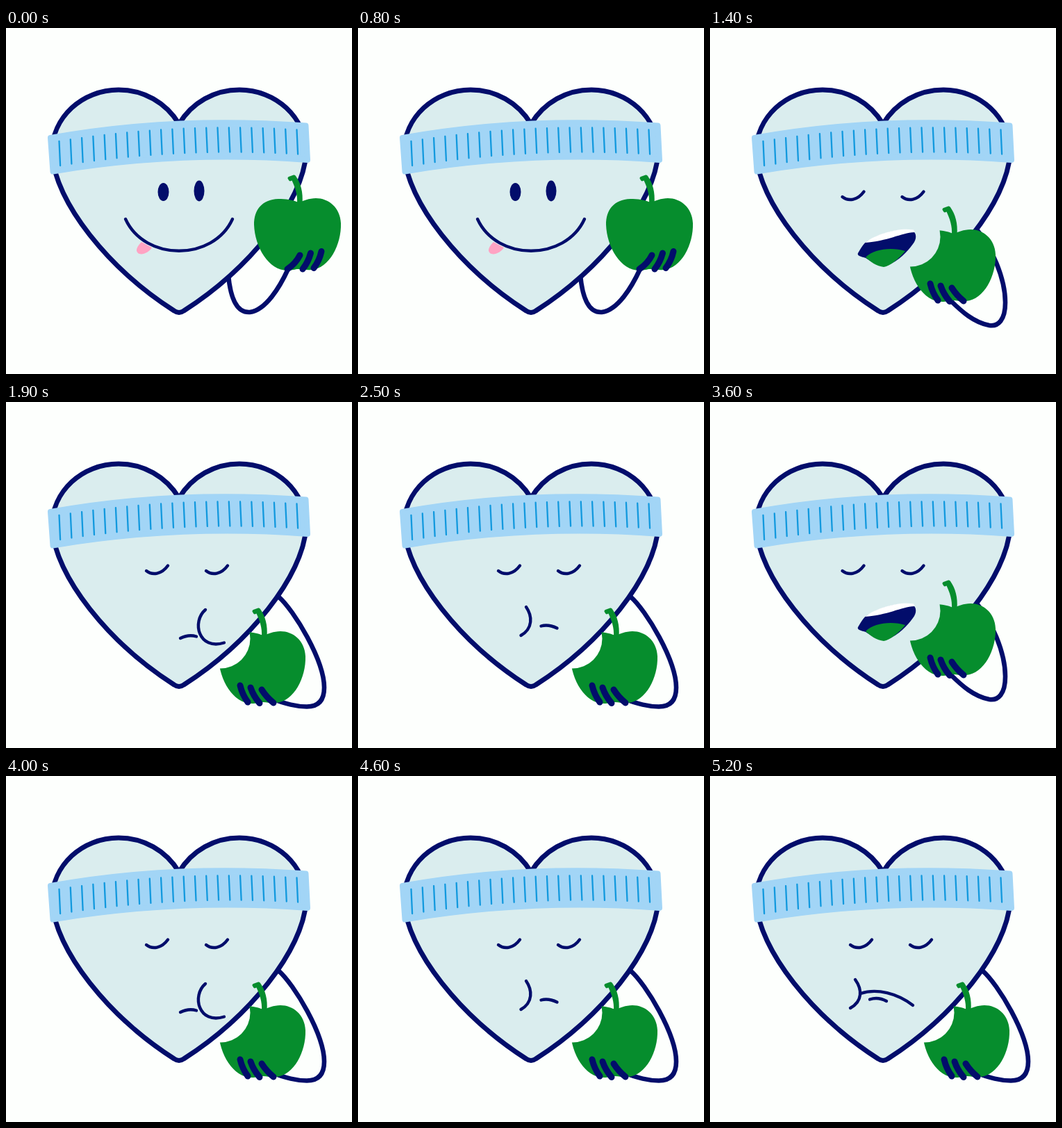
Write an HTML page that moves like this. It is 498x498 px and loops after 5.3 s.

```html
<!DOCTYPE html>
<html lang="en">
<head>
<meta charset="utf-8">
<title>Heart eating an apple</title>
<style>
  html, body { margin: 0; width: 100%; height: 100%; overflow: hidden; background: #fdfffd; }
  svg { display: block; width: 498px; height: 498px; }
  .line { fill: none; stroke: #020d6b; stroke-width: 4.4; stroke-linecap: round; stroke-linejoin: round; }
  .arm { stroke-width: 6.6; }
  .fingers { stroke-width: 9; }
  .ink { fill: #020d6b; }
  .green { fill: #068d2d; }
  [data-on] { display: none; }
</style>
</head>
<body>
<svg viewBox="0 0 498 498">
  <defs>
    <mask id="bite" maskUnits="userSpaceOnUse" x="340" y="200" width="158" height="160">
      <rect x="340" y="200" width="158" height="160" fill="#fff"/>
      <circle cx="359.5" cy="255.5" r="43"/>
    </mask>
    <g id="apple" class="green">
      <path d="M421 251C412 247 402 246 392 246C368 247 357 262 357 283C358 315 378 349 405 349C412 349 416 347 421 347C428 347 432 349 440 348C465 346 483 312 482 281C481 258 464 245 446 245C436 245 428 249 421 251Z"/>
      <path d="M406 217.500Q404.500 215.500 407 214L414 211.500Q416 211 417 213C424 223 428 236 426.500 253L419 253C420 240 416 229 411.500 219.500L409 220.500Q407.500 220.500 406 217.500Z"/>
    </g>
    <g id="bitten"><use href="#apple" mask="url(#bite)"/></g>
    <g id="grip" class="line fingers">
      <path d="M337 408Q340 421 348 432M352 411Q356 423 365 433.500M368 414Q375 425 385 433"/>
    </g>
    <g id="lids" class="line">
      <path d="M202 243C211 250 224 248 233 235.500M288 243C297 250 310 248 319 235.500"/>
    </g>
  </defs>

  <g class="line arm">
    <path data-on="smile" d="M320 356C324 398 337 410 351 409C374 406 394 373 406 347"/>
    <path data-on="gape" d="M372 308C395 350 414 420 415 455C415 468 409 474 401 470C377 457 342 404 325 378"/>
    <path data-on="bite" d="M384 290C405 315 425 360 425 395C425 420 415 430 402 428C380 424 362 408 346 392"/>
    <path data-on="chew" d="M392 280C415 300 458 372 458 411C458 432 447 438.500 433 438.500C415 438.500 400 433 388 429"/>
  </g>

  <path class="line" style="fill:#daedee;stroke-width:7"
    d="M249 138C230 107 198 89 162 89C110 89 66 128 66 180C70.500 251.500 148.500 347 242 407Q249 412 256 407C349.500 347 427.500 251.500 432 180C432 128 388 89 336 89C300 89 268 107 249 138Z"/>
  <path fill="#a2d5f6" stroke="#a2d5f6" stroke-width="8" stroke-linejoin="round"
    d="M64 158Q240 126.500 431.500 140.500L434 190Q250 176 67.500 206.500Z"/>
  <path id="ticks" fill="none" stroke="#1299de" stroke-width="2.300" stroke-linecap="round"/>

  <g data-on="smile">
    <ellipse class="ink" cx="226.500" cy="236" rx="8" ry="13"/>
    <ellipse class="ink" cx="278" cy="234.500" rx="7.500" ry="15"/>
    <path fill="#ffa3c3" d="M195 308L210 316C206 323 195 328 190 324C185 320 190 313 195 308Z"/>
    <path class="line" d="M172 275C200 336 298 336 326 275"/>
    <use href="#apple"/>
    <path class="line fingers" d="M405 347Q417 339 423 327M427 347Q435 337 438.500 324M443 345.500Q451 335 454 321.500"/>
  </g>

  <g data-on="gape">
    <ellipse class="ink" cx="234" cy="223.500" rx="8" ry="13"/>
    <ellipse class="ink" cx="270.500" cy="225" rx="7.500" ry="15"/>
    <path class="ink" d="M205 313C205 285 245 262 285 263C298 264 304 272 303 284C302 310 285 341 243 341C220 340 205 330 205 313Z"/>
    <use href="#apple" x="-86.500" y="37"/>
    <use href="#grip" x="-36.500" y="-47"/>
  </g>

  <g data-on="bite">
    <use href="#lids" x="-11.500"/>
    <path class="ink" d="M213 324C218 316 222 308 228 306C250 293 275 289 290 291C298 294 298 304 292 311C284 322 272 335 255 342C245 345 230 335 224 331C218 329 211 328 213 324Z"/>
    <path fill="#fff" d="M223 309C240 296 272 287 293 290.500Q295 292 294 294C275 295 255 307 223 309Z"/>
    <path class="green" d="M224 330C235 318 262 315 281 321C270 334 258 343 250 344C240 343 230 336 224 330Z"/>
    <use href="#bitten" x="-71" y="45"/>
    <use href="#grip" x="-20" y="-40"/>
  </g>

  <g data-on="chew">
    <use href="#lids"/>
    <g class="line">
      <path data-on="mid" d="M242 295C251 308 252 326 234.500 336M263.500 322.500Q274 319.500 286.500 325.500"/>
      <path data-on="right" d="M287 299C267 316 277 358 314 346.500M251 340Q263 334 274 337.500"/>
      <path data-on="left" d="M209 293C219 307 220 324 202 334M217 313C240 305 270 313 292 330M230 321.500Q242 317.500 254 324"/>
    </g>
    <use href="#bitten" x="-51" y="85"/>
    <use href="#grip"/>
  </g>
</svg>
<script>
  const LOOP = 5300, STEP = 100;
  const BITES = [900, 3100];
  // Poses within one bite, with their delay after it begins
  const POSES = [
    [0, 'gape'], [300, 'bite'],
    [600, 'chew mid'], [900, 'chew right'], [1100, 'chew left'],
    [1400, 'chew mid'], [1700, 'chew right'], [2000, 'chew left']
  ];
  const timeline = [[0, 'smile'], ...BITES.flatMap(b => POSES.map(([d, p]) => [b + d, p]))];

  const quad = (a, b, c, t) => a * (1 - t) ** 2 + 2 * b * t * (1 - t) + c * t * t;
  let ticks = '';
  for (let i = 0; i < 22; i++) {
    const t = i / 21, x = 76.5 + 342 * t;
    ticks += `M${x} ${quad(163, 135.5, 146.5, t)}L${x + 1.6} ${quad(198, 171, 181.5, t)}`;
  }
  document.getElementById('ticks').setAttribute('d', ticks);

  const parts = [...document.querySelectorAll('[data-on]')];
  let shown = '';

  function show(pose) {
    if (pose === shown) return;
    shown = pose;
    const active = pose.split(' ');
    for (const el of parts) {
      el.style.display = active.includes(el.dataset.on) ? 'inline' : 'none';
    }
  }

  const start = performance.now();
  function draw(now) {
    const t = Math.floor((Math.max(0, now - start) % LOOP) / STEP) * STEP;
    show(timeline.findLast(([at]) => at <= t)[1]);
    requestAnimationFrame(draw);
  }
  draw(start);
</script>
</body>
</html>
```
